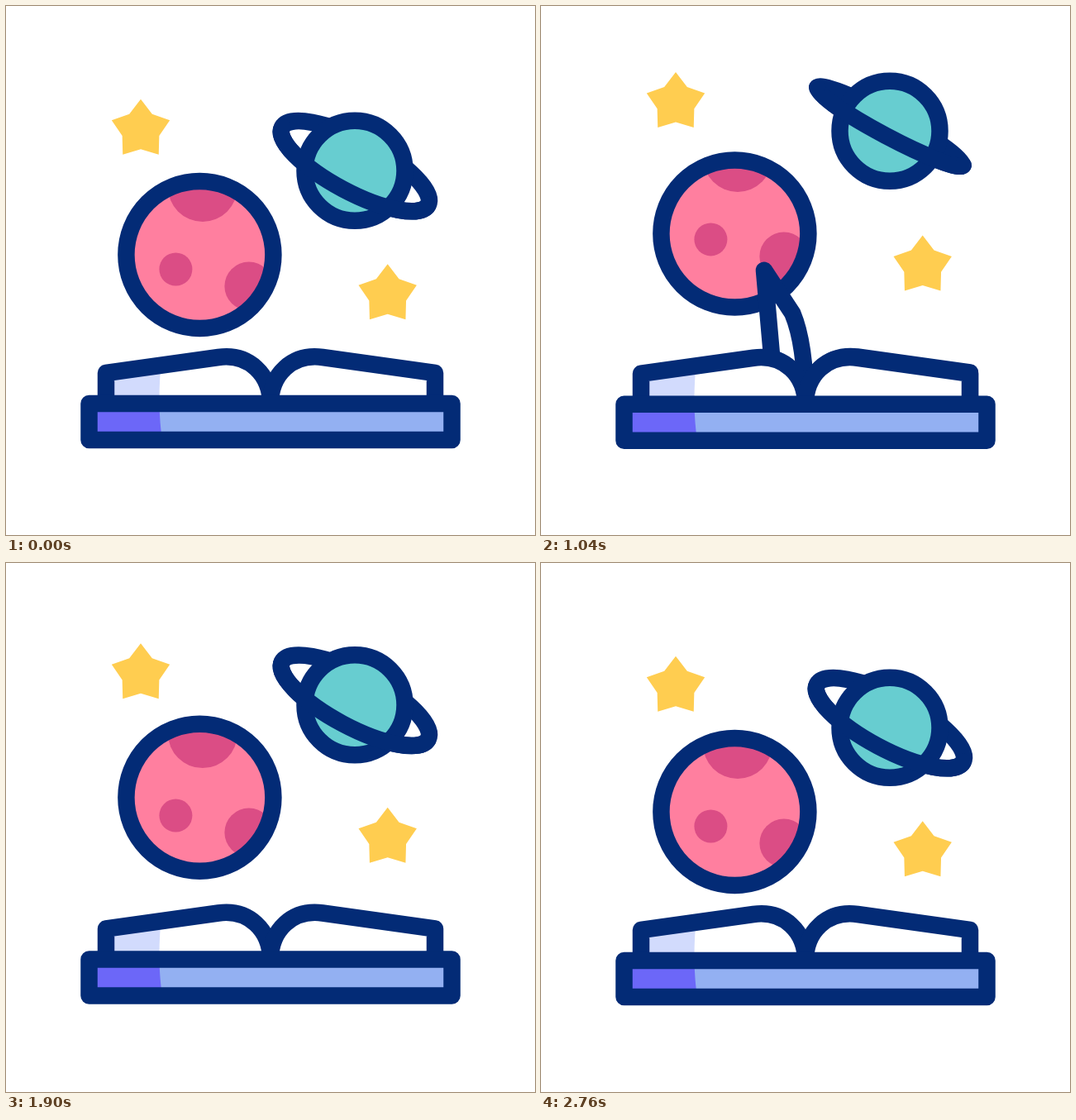
An HTML page with a canvas that plays this animation: 640x640 px, repeating every 2960 ms.

```html
<!DOCTYPE html>
<html lang="en">
<head>
<meta charset="utf-8">
<title>Space book</title>
<style>
  html, body { margin: 0; width: 100%; height: 100%; overflow: hidden; background: #fff; }
  canvas { display: block; width: 640px; height: 640px; }
</style>
</head>
<body>
<canvas width="640" height="640"></canvas>
<script>
const ctx = document.querySelector('canvas').getContext('2d');
const NAVY = '#032b76', PINK = '#ff7f9f', ROSE = '#db4d85', TEAL = '#67cdd0',
      YELLOW = '#ffcd50', BLUE = '#93b0f2', VIOLET = '#6c67f8', PALE = '#d2dbfd';
const LOOP = 2960, STEP = 20, HOLD = 180, LAST = 129;
const PAGE_START = 14, PAGE_STEPS = 43, PAGE_GAP = 28.6;
const { PI, sin, cos, min, max } = Math;

const leftPage = new Path2D('M121 481V444L257 425C294 420 320 446 320 481');
const rightPage = new Path2D('M519 481V444L383 425C346 420 320 446 320 481');
const cover = new Path2D('M100.5 481H539.5V525H100.5Z');
const shade = new Path2D('M100 420H189Q182 478 189 525H100Z');

const clamp = (v, low, high) => min(high, max(low, v));
const ease = u => (1 - cos(PI * u)) / 2;

// Two smooth rises and falls between 0 and 1, at rest before and after.
const bob = (k, delay, period) => ease(2 * clamp((k - delay) / period, 0, 2));

// One soft bump between two steps.
const bump = (k, from, to) => ease(2 * clamp((k - from) / (to - from), 0, 1));

// Swings between turning points, starting and ending at zero.
function swing(k, ...turns) {
  let value = 0, from = 0;
  for (const [to, goal] of [...turns, [LAST, 0]]) {
    if (k <= to) return value + (goal - value) * ease((k - from) / (to - from));
    [from, value] = [to, goal];
  }
  return value;
}

function paint(shape, fill, stroke) {
  if (fill) { ctx.fillStyle = fill; ctx.fill(shape); }
  if (stroke) { ctx.strokeStyle = stroke; ctx.lineWidth = 20.5; ctx.stroke(shape); }
}

function disc(x, y, r) {
  const path = new Path2D();
  path.arc(x, y, r, 0, 2 * PI);
  return path;
}

function at(x, y, draw) {
  ctx.save();
  ctx.translate(x, y);
  draw();
  ctx.restore();
}

function clipped(path, draw) {
  ctx.save();
  ctx.clip(path);
  draw();
  ctx.restore();
}

function star() {
  const path = new Path2D();
  for (let i = 0; i < 10; i++) {
    const r = i % 2 ? 23.5 : 37, a = i * PI / 5;
    path.lineTo(r * sin(a), -r * cos(a));
  }
  paint(path, YELLOW);
}

function moon(roll) {
  const body = disc(0, 0, 89);
  paint(body, PINK);
  clipped(body, () => {
    paint(disc(3.5, roll - 82, 42), ROSE);
    paint(disc(-29, roll + 17.5, 20), ROSE);
    paint(disc(59.5, roll + 38, 29.5), ROSE);
  });
  paint(body, null, NAVY);
}

function ring(depth, end) {
  const path = new Path2D();
  path.ellipse(0.4, -5.5, 100, depth, 28 * PI / 180, 0, end);
  paint(path, null, NAVY);
}

function planet(depth) {
  ring(depth, 2 * PI);
  paint(disc(0, 0, 60.5), TEAL, NAVY);
  ring(depth, PI);
}

// The tip travels along an arc from the right page to the left one.
function turningPage(k) {
  const u = (k - PAGE_START) / PAGE_STEPS;
  if (u <= 0 || u >= 1) return;
  const angle = PI * (0.8 * u + 0.2 * u ** 4);
  const c = cos(angle), s = sin(angle);
  const path = new Path2D();
  path.moveTo(320, 481);
  path.bezierCurveTo(320, 446 - 20 * s, 320 + 26 * c, 420 - 28 * s, 320 + 63 * c, 425 - 56 * s);
  path.lineTo(320 + 199 * c, 444 - 130 * s ** 1.2);
  path.lineTo(320 + 199 * c * (0.8 + 0.2 * c * c), 425 + 56 * c ** 4);
  paint(path, '#fff', NAVY);
}

function book(k) {
  turningPage(k);
  turningPage(k - PAGE_GAP);
  paint(leftPage, '#fff');
  clipped(leftPage, () => paint(shade, PALE));
  paint(leftPage, null, NAVY);
  paint(rightPage, '#fff', NAVY);
  paint(cover, BLUE);
  clipped(cover, () => paint(shade, VIOLET));
  paint(cover, null, NAVY);
}

function frame(now) {
  const t = Math.floor(now % LOOP / STEP) * STEP;
  const k = clamp((t - HOLD) / STEP, 0, LAST);
  const roll = swing(k, [22, 8], [45, -11], [70, 13], [107, -9]);
  const bookY = swing(k, [7, 14.5], [79, -13], [98, 25.5], [115, -5]);
  const starY = 12 * bump(k, 10, 44) - 34.5 * bob(k, 20, 53.5);
  const moonY = -25.5 * bob(k, 17.5, 52.4);
  const planetY = -48.5 * bob(k, 18, 53.5);
  const ringDepth = 31.5 + min(0.1 * roll, 1.8 * roll);

  ctx.fillStyle = '#fff';
  ctx.fillRect(0, 0, 640, 640);
  ctx.lineJoin = ctx.lineCap = 'round';
  at(163, 149.7 + starY, star);
  at(461.7, 349.2 + starY * 1.06, star);
  at(422, 199.2 + planetY, () => planet(ringDepth));
  at(234.4, 301 + moonY, () => moon(roll));
  at(0, bookY, () => book(k));
  requestAnimationFrame(() => frame(performance.now()));
}
frame(0);
</script>
</body>
</html>
```
